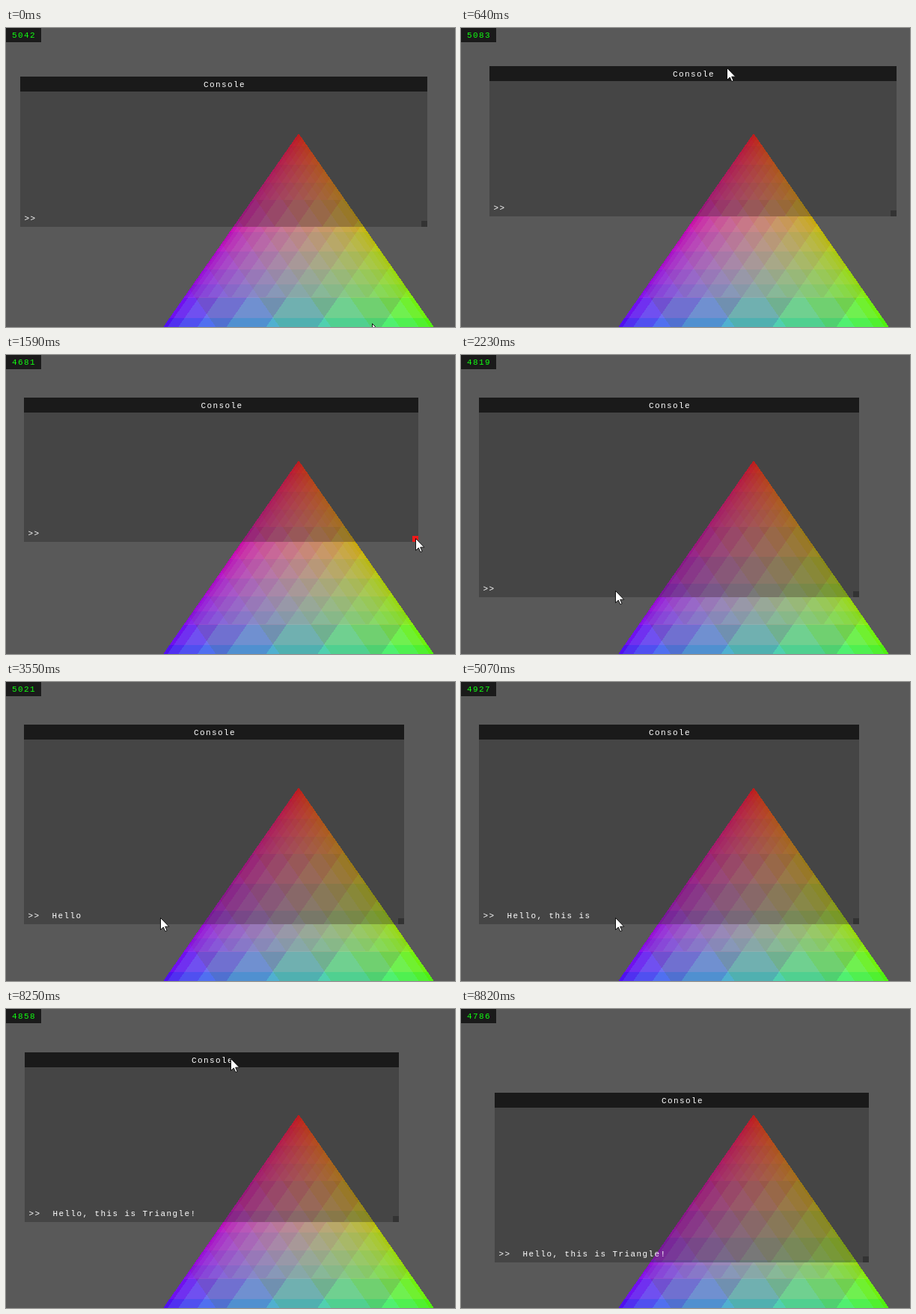
Write an HTML page with a canvas that moves like this. It is 600 by 400 pixels and loops after 9.28 s.

```html
<!DOCTYPE html>
<html lang="en">
<head>
<meta charset="utf-8">
<title>Console over a triangle</title>
<style>
  html, body { margin: 0; width: 100%; height: 100%; overflow: hidden; background: #595959; }
  canvas { display: block; }
</style>
</head>
<body>
<canvas id="stage" width="600" height="400"></canvas>
<script>
const W = 600, H = 400, LOOP = 9280;
const ctx = document.getElementById('stage').getContext('2d');

// time, x, y of the pointer tip
const path = [
  [30, 490, 396], [320, 337, 68], [440, 323, 64], [640, 356, 54], [920, 342, 60],
  [1350, 565, 254], [1550, 565, 254], [1590, 548, 246], [1950, 529, 320],
  [2220, 207, 316], [7280, 207, 316], [7320, 235, 318], [7580, 529, 320],
  [7860, 521, 280], [8220, 300, 66], [8540, 321, 121], [8780, 335, 405]
];

// The console follows the pointer while it is dragged by its title or its corner.
const drags = [
  { from: 320, to: 920 },
  { from: 1550, to: 1950, corner: true },
  { from: 7580, to: 7860, corner: true },
  { from: 8220, to: 8540 }
];

const KEY_GAP = 120;
const bursts = [
  [2990, 'Hello'], [4100, ', '], [4370, 'this '], [4950, 'is '],
  [5600, 'Trian'], [6190, 'gle'], [7000, '!']
];
const rates = [5042, 5083, 4681, 4819, 5021, 4874, 4927, 4951, 4932, 4858, 4786];

const arrow = new Path2D('M.5 .5V16.5L4.3 13 6.8 18.6 9.1 17.6 6.7 12.2H11.8Z');

const clamp = (v, lo, hi) => Math.min(hi, Math.max(lo, v));

function pointerAt(t) {
  const next = path.findIndex(k => k[0] > t);
  const [t1, x1, y1] = path.at(next);
  const [t0, x0, y0] = path.at(Math.max(0, next < 0 ? -1 : next - 1));
  const u = t1 > t0 ? (t - t0) / (t1 - t0) : 0;
  const e = u * u * (3 - 2 * u);
  return [Math.round(x0 + (x1 - x0) * e), Math.round(y0 + (y1 - y0) * e)];
}

function consoleAt(t) {
  const win = { x: 19, y: 65, w: 544, h: 201 };
  for (const { from, to, corner } of drags) {
    const [x0, y0] = pointerAt(from);
    const [x1, y1] = pointerAt(clamp(t, from, to));
    win[corner ? 'w' : 'x'] += x1 - x0;
    win[corner ? 'h' : 'y'] += y1 - y0;
  }
  return win;
}

const typedAt = t => bursts.map(([start, text]) =>
  text.slice(0, Math.max(0, Math.floor((t - start) / KEY_GAP) + 1))).join('');

const encode = v => 255 * (v <= 0.0031308 ? 12.92 * v : 1.055 * v ** (1 / 2.4) - 0.055);

// Colour triangle blended in linear light, shown in steps that widen below splitY.
function makeScene(light, haze, splitY, fine, coarse) {
  const layer = document.createElement('canvas');
  layer.width = W;
  layer.height = H;
  const c = layer.getContext('2d');
  const img = c.createImageData(W, H);
  const grey = encode(0.1 * light + haze);
  for (let y = 0, p = 0; y < H; y++) {
    const step = y < splitY ? fine : coarse;
    const r = (420.5 - y) / 280;
    for (let x = 0; x < W; x++, p += 4) {
      const side = (x + 0.5 - 391) / 195.5;
      const rgb = [r, (1 - r + side) / 2, (1 - r - side) / 2];
      const inside = rgb.every(v => v >= 0);
      rgb.forEach((v, i) => {
        img.data[p + i] = inside
          ? (Math.floor(encode(v * light + haze) / step) + 0.5) * step
          : grey;
      });
      img.data[p + 3] = 255;
    }
  }
  c.putImageData(img, 0, 0);
  return layer;
}

const scene = makeScene(1, 0, 360, 16, 32);
const shaded = makeScene(0.5, 0.01, 230, 8, 16);

function box(color, x, y, w, h) {
  ctx.fillStyle = color;
  ctx.fillRect(x, y, w, h);
}

function write(text, x, y, color = '#fff') {
  ctx.fillStyle = color;
  ctx.fillText(text, x, y);
}

function draw(t) {
  const [px, py] = pointerAt(t);
  const { x, y, w, h } = consoleAt(t);
  const gripX = x + w - 8, gripY = y + h - 8;
  const hover = px >= gripX && px < gripX + 8 && py >= gripY && py < gripY + 8;

  ctx.font = '11px "Liberation Mono", monospace';
  ctx.letterSpacing = '1.4px';
  ctx.drawImage(scene, 0, 0);
  ctx.drawImage(shaded, x, y, w, h, x, y, w, h);
  box('#1a1a1a', x, y, w, 20);
  box(hover ? '#f01818' : '#333', gripX, gripY, 8, 8);
  write('Console', x + w / 2 - 27, y + 14);
  write('>>  ' + typedAt(t), x + 5.5, gripY);

  box('#1a1a1a', 0, 0, 47, 19);
  write(rates[Math.floor((t + 810) / 945)], 8, 13, '#1f1');

  ctx.save();
  ctx.translate(px - 1, py - 1);
  ctx.fillStyle = '#fff';
  ctx.strokeStyle = '#111';
  ctx.fill(arrow);
  ctx.stroke(arrow);
  ctx.restore();
}

const start = performance.now();
function tick() {
  draw((performance.now() - start) % LOOP);
  requestAnimationFrame(tick);
}
tick();
</script>
</body>
</html>
```
